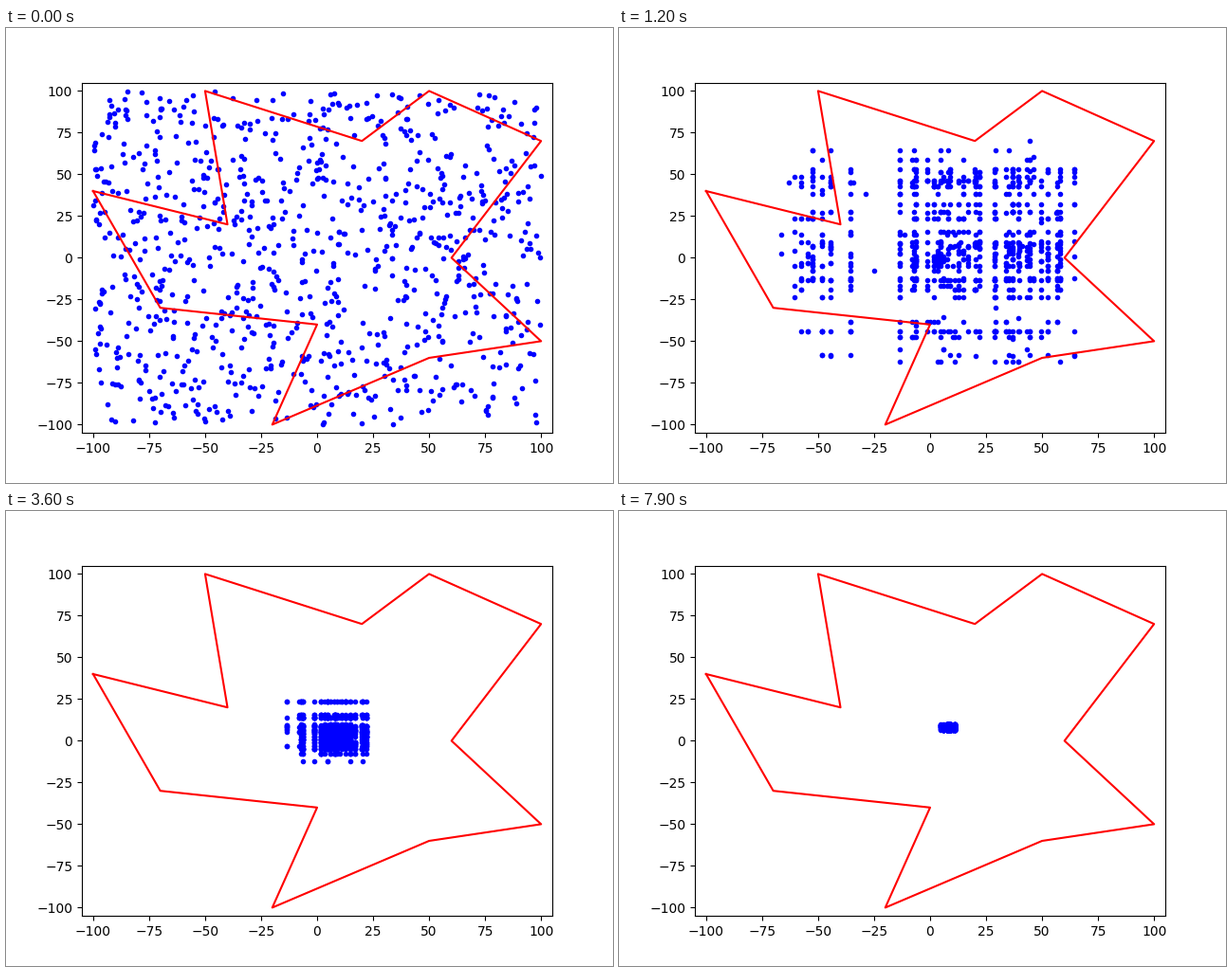
A matplotlib script that plays this animation: 640x480 px, repeating every 8 s.

```python
import numpy as np
import matplotlib.pyplot as plt
from matplotlib.animation import FuncAnimation

FRAMES = 80
COUNT = 900
GENES = 56
CENTER = 8.7  # both coordinates settle here

POLYGON = [(-100, 40), (-40, 20), (-50, 100), (20, 70), (50, 100), (100, 70),
           (60, 0), (100, -50), (50, -60), (-20, -100), (0, -40), (-70, -30)]


def make_genes(seed):
    """Coordinate values that survive, packed closer near the centre."""
    rng = np.random.default_rng(seed)
    spread = 108 * ((np.arange(GENES) + rng.random(GENES)) / GENES) ** 1.8
    values = CENTER + spread * rng.choice([-1, 1], GENES)
    freq = rng.uniform(0.3, 1.6, GENES) * (spread + 1) ** 0.45
    return values, freq


X_GENES = make_genes(3)
Y_GENES = make_genes(8)


def draw_coords(rng, gen, genes, floor):
    """Recombine the genes that still fit inside the shrinking extent."""
    values, freq = genes
    half = 100 * np.exp(-(gen / 24) ** 1.3) + floor
    middle = CENTER * max(0, 1 - half / 100)
    lo, hi = max(-100, middle - half), min(100, middle + half)
    fit = np.clip(1 - ((values - middle) / half) ** 2, 0, 1)
    weight = freq * fit * (abs(values) < 100)
    inherited = rng.choice(values, COUNT, p=weight / weight.sum())
    fresh = rng.uniform(lo, hi, COUNT)
    return np.where(rng.random(COUNT) < np.exp(-gen / 3), fresh, inherited)


def population(gen):
    rng = np.random.default_rng(100 + gen)
    return (draw_coords(rng, gen, X_GENES, 3),
            draw_coords(rng, gen, Y_GENES, 1.5))


fig, ax = plt.subplots(figsize=(6.4, 4.8), dpi=100)
ax.set_xlim(-105, 105)
ax.set_ylim(-105, 105)
dots, = ax.plot([], [], "b.")
ax.plot(*zip(*POLYGON, POLYGON[0]), "r")


def update(gen):
    dots.set_data(*population(gen))
    return dots,


anim = FuncAnimation(fig, update, frames=FRAMES, interval=100,
                     init_func=lambda: update(0), repeat=True, repeat_delay=0)
plt.show()
```
